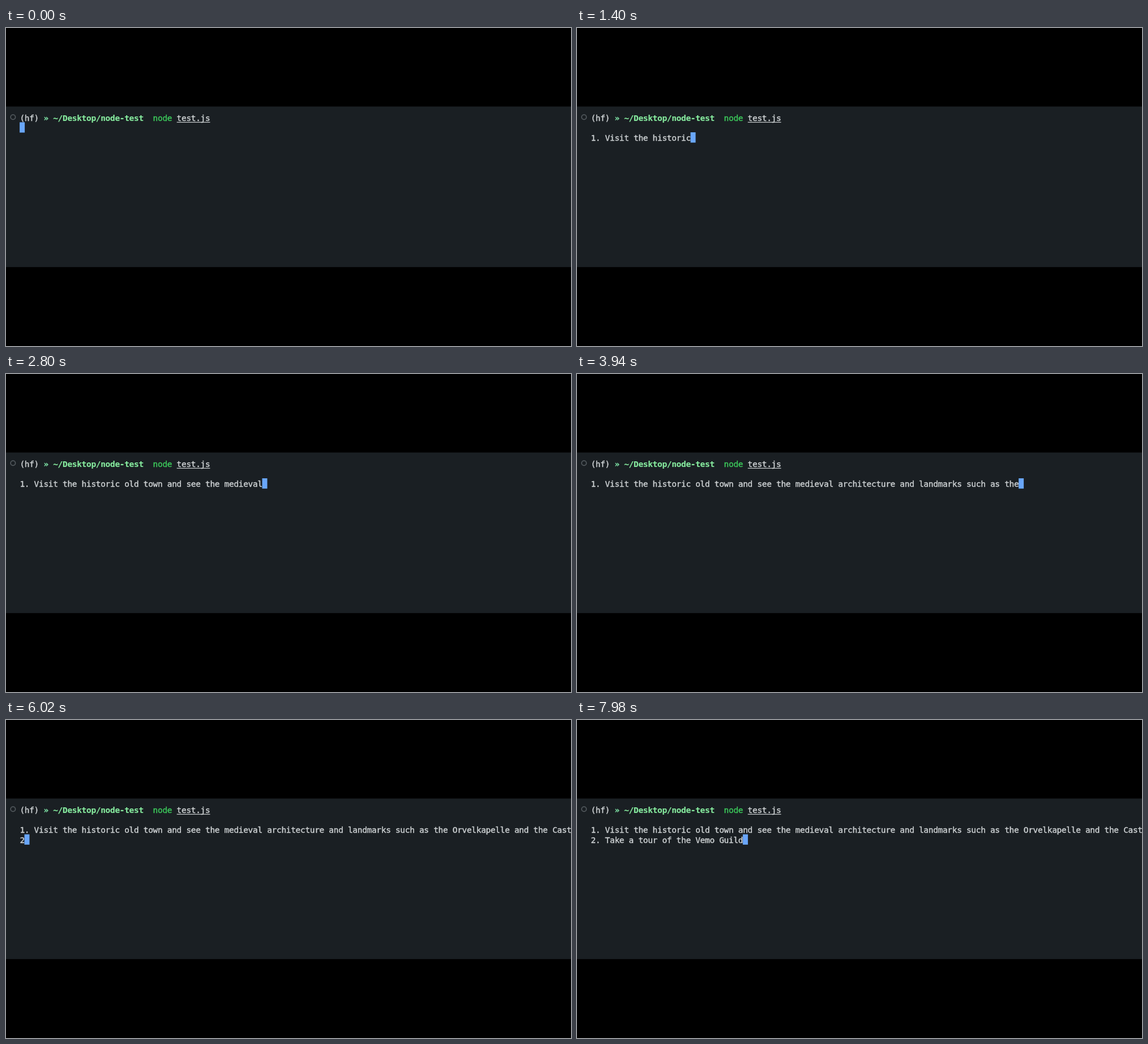
An HTML page that plays this animation: 998x561 px, repeating every 8 s.

```html
<!DOCTYPE html>
<html lang="en">
<head>
<meta charset="utf-8">
<title>Terminal</title>
<style>
  html, body { margin: 0; width: 100%; height: 100%; overflow: hidden; background: #000; }
  svg { display: block; width: 998px; height: 561px; }
  text {
    font: 14.5px "DejaVu Sans Mono", "Liberation Mono", monospace;
    letter-spacing: -.33px;
    white-space: pre;
    fill: #cdd1d3;
    stroke: #cdd1d3;
    stroke-width: .4px;
  }
  .bold { font-weight: 700; stroke-width: .2px; }
  .arrow { fill: #7fe3a6; stroke: #7fe3a6; }
  .path { fill: #85e89d; stroke: #85e89d; }
  .cmd { fill: #3cc95b; stroke: #3cc95b; }
</style>
</head>
<body>
<svg viewBox="0 0 998 561">
  <rect width="998" height="561" fill="#000"/>
  <rect y="138.5" width="998" height="283.3" fill="#1a1f23"/>
  <circle cx="12.4" cy="157.2" r="4.2" fill="none" stroke="#565c61" stroke-width="1.6"/>
  <text x="24.4" y="164">(hf)</text>
  <text class="bold arrow" x="66.4" y="164">»</text>
  <text class="bold path" x="83.2" y="164">~/Desktop/node-test</text>
  <text class="cmd" x="259.6" y="164">node</text>
  <text x="301.6" y="164">test.js</text>
  <rect x="301.7" y="165.7" width="58.8" height="1.2" fill="#cdd1d3"/>
  <text class="line" x="24.4" y="182"></text>
  <text class="line" x="24.4" y="199"></text>
  <text class="line" x="24.4" y="217"></text>
  <rect id="cursor" width="9" height="18.2" fill="#69a6fa"/>
</svg>
<script>
  const LOOP = 8000, LEFT = 24.1, TOP = 166.3, CELL = 8.4, ROW = 17.7;

  // Each token is appended at its time in ms.
  const tokens = [
    [220, "\n"], [440, "1"], [660, "."], [860, " Visit"], [1080, " the"],
    [1300, " historic"], [1520, " old"], [1740, " town"], [1960, " and"],
    [2180, " see"], [2380, " the"], [2600, " medieval"], [2820, " architecture"],
    [3020, " and"], [3220, " landmarks"], [3420, " such"], [3620, " as"],
    [3820, " the"], [4040, " Orv"], [4200, "elk"], [4460, "ape"], [4640, "lle"],
    [4840, " and"], [5060, " the"], [5240, " Cast"], [5420, "le"], [5600, "."],
    [5780, "\n"], [5960, "2"], [6140, "."], [6300, " Take"], [6500, " a"],
    [6700, " tour"], [6900, " of"], [7100, " the"], [7300, " V"], [7500, "emo"],
    [7700, " Guild"]
  ];

  const lines = document.querySelectorAll(".line");
  const cursor = document.getElementById("cursor");
  let shown = -1;

  function draw(t) {
    const done = tokens.filter(([at]) => at <= t);
    if (done.length === shown) return;
    shown = done.length;
    const rows = done.map(([, s]) => s).join("").split("\n");
    lines.forEach((el, i) => { el.textContent = rows[i] || ""; });
    const last = rows.length - 1;
    cursor.setAttribute("x", LEFT + rows[last].length * CELL);
    cursor.setAttribute("y", TOP + last * ROW);
  }

  const start = performance.now();
  function tick() {
    draw((performance.now() - start) % LOOP);
    requestAnimationFrame(tick);
  }
  tick();
</script>
</body>
</html>
```
